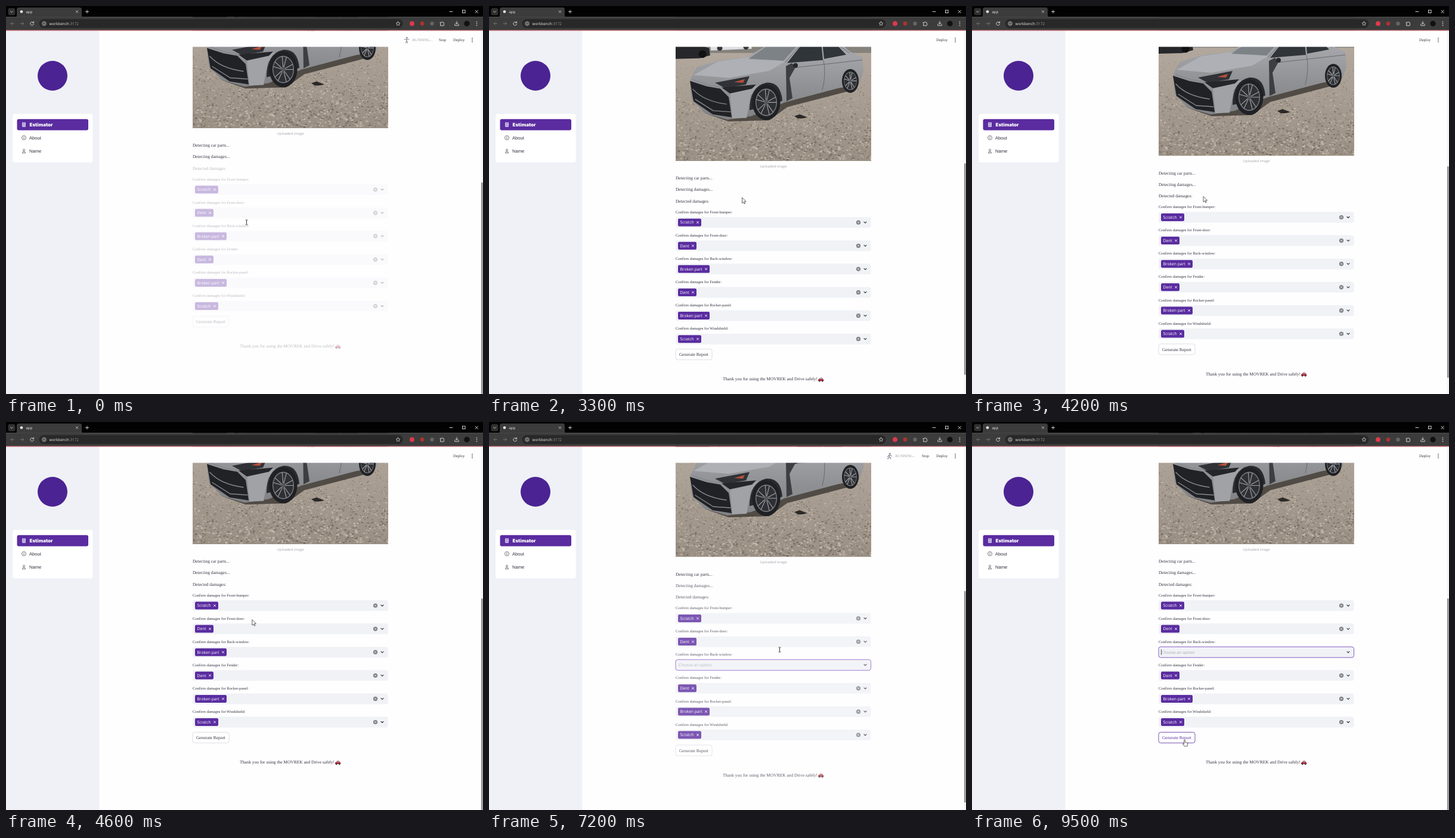
Animation, 800 px wide and 651 px high, one loop 9600 ms. Source, as an HTML page:

```html
<!DOCTYPE html>
<html lang="en">
<head>
<meta charset="utf-8">
<title>app</title>
<style>
html, body { margin: 0; width: 100%; height: 100%; overflow: hidden; background: #fffeff; }
svg { display: block; width: 100vw; height: 100vh; }
text { font-family: "Liberation Serif", serif; font-size: 7.45px; fill: #31333f; text-rendering: geometricPrecision; white-space: pre; }
.label { font-size: 6.5px; }
.sans { font-family: "Open Sans", "Noto Sans", sans-serif; font-size: 6.75px; }
.tag { font-weight: 500; fill: #fff; }
.menu { font-family: "Liberation Sans", sans-serif; font-size: 7.6px; }
.line { fill: none; stroke-linecap: round; stroke-linejoin: round; }
</style>
</head>
<body>
<svg id="stage" viewBox="0 0 800 651" preserveAspectRatio="none"></svg>
<script>
const LOOP = 9600, STEP = 100;
const PURPLE = '#5a2ca0', INK = '#31333f', FIELD = '#f0f2f6';
const IMG_SHIFT = -220.5;

const rect = (x, y, w, h, fill, r = 0, more = '') =>
  `<rect x="${x}" y="${y}" width="${w}" height="${h}" rx="${r}" fill="${fill}" ${more}/>`;
const circle = (x, y, r, fill, more = '') => `<circle cx="${x}" cy="${y}" r="${r}" fill="${fill}" ${more}/>`;
const shape = (d, fill) => `<path d="${d}" fill="${fill}"/>`;
const line = (d, color, w = 1, more = '') => `<path class="line" d="${d}" stroke="${color}" stroke-width="${w}" ${more}/>`;
const text = (x, y, str, cls = '', more = '') => `<text x="${x}" y="${y}" class="${cls}" ${more}>${str}</text>`;
const cross = (x, y, r, color, w) => line(`M${x - r} ${y - r}l${2 * r} ${2 * r}m0 ${-2 * r}l${-2 * r} ${2 * r}`, color, w);
const dots = (x, y, color) => [-3, 0, 3].map(d => circle(x, y + d, 0.85, color)).join('');
const chevron = y => line(`M629 ${y - 1}l2 2 2 -2`, INK, 1.1);

function random(seed) {
  return () => (seed = (seed * 16807) % 2147483647) / 2147483647;
}

// Browser window
function chrome() {
  const pale = '#dedede', dim = '#777';
  return rect(0, 0, 800, 18.5, '#020202') +
    rect(3.5, 3.5, 12, 12, '#303030', 3) + line('M7.5 8.7l2 2 2 -2', pale, 0.9) +
    shape('M15 18.5q3 0 3 -3V6q0 -3.5 3.5 -3.5H123.5q3.5 0 3.5 3.5V15.5q0 3 3 3Z', '#3c3c3c') +
    rect(0, 18.3, 800, 22.4, '#3c3c3c') +
    circle(26, 9.5, 2.3, '#eee') +
    text(33.5, 11.8, 'app', 'sans', 'style="fill:#eee;font-size:6px"') +
    cross(119, 9.5, 1.7, pale, 0.8) +
    line('M133.5 9.5h5m-2.5 -2.5v5', pale, 0.9) +
    line('M744 9.5h5M787 7.2l4.5 4.5m0 -4.5l-4.5 4.5', '#fff', 0.8) +
    rect(765.5, 7, 4.6, 4.6, 'none', 0, 'stroke="#fff" stroke-width=".8"') +
    line('M13.5 29.5h-5.5m2.4 -2.4l-2.4 2.4 2.4 2.4M24 29.5h5.5m-2.4 -2.4l2.4 2.4 -2.4 2.4', dim, 0.9) +
    line('M45.9 27.7a2.9 2.9 0 1 0 .6 2.6M46.5 26.2v2h-2', pale, 0.9) +
    rect(55.5, 22, 610, 15, '#282828', 7.5) +
    circle(64, 29.5, 5, '#3c3c3c') +
    circle(64, 29.5, 2.8, 'none', `stroke="${pale}" stroke-width=".7"`) +
    line('M64 29.3v1.5M64 28v.1', pale, 0.7) +
    text(72.5, 31.8, 'workbench<tspan fill="#9a9a9a">:3172</tspan>', 'sans', 'style="fill:#eee;font-size:6.4px"') +
    line('M657.5 26l1 2.2 2.4 .3 -1.8 1.6 .5 2.4 -2.1 -1.2 -2.1 1.2 .5 -2.4 -1.8 -1.6 2.4 -.3Z', pale, 0.7) +
    circle(681, 29.5, 3.9, '#e0394b') + circle(698, 29.5, 3.4, '#a8342f') + circle(714.5, 29.5, 3.2, '#666') +
    line('M728.5 27.5h2a1 1 0 0 1 2 0h1.5v2a1 1 0 0 1 0 2v1.5h-5.5v-2a1 1 0 0 0 0 -2Z', pale, 0.9) +
    line('M756 25.8v4.5m-2 -2l2 2 2 -2M752.8 30.5v2.3h6.4v-2.3', pale, 0.9) +
    circle(773, 29.5, 4.7, '#111') + dots(789.5, 29.5, pale) +
    rect(0, 40.2, 800, 1.3, '#b9575b');
}

function sidebar() {
  return rect(0, 41, 156.5, 610, '#eff1f6') +
    circle(78, 117, 25, '#4b2393') +
    rect(11, 181, 134.5, 81.5, '#fff', 4) +
    rect(18.5, 189.8, 119.5, 18.6, PURPLE, 3) +
    rect(27, 195.3, 6, 7.6, '#d9cdf0', 0.8) + line('M28.5 197h3M28.5 199.5h.1m1.4 0h.1m1.4 0h.1M28.5 201.3h.1m1.4 0h.1m1.4 0h.1', PURPLE, 0.8) +
    text(39.5, 202, 'Estimator', '', 'style="font:900 8px Inter,sans-serif;fill:#fff"') +
    circle(30, 221, 3.5, 'none', 'stroke="#444" stroke-width=".7"') + line('M30 220.6v2M30 219.2v.1', '#444', 0.8) +
    text(39, 223.8, 'About', 'menu') +
    circle(30, 241.7, 1.5, 'none', 'stroke="#444" stroke-width=".7"') +
    line('M27.4 246.3q0 -2.2 2.6 -2.2t2.6 2.2Z', '#444', 0.7) +
    text(39, 246.2, 'Name', 'menu');
}

// Photo as flat shapes
function gravel() {
  const rnd = random(41), tones = ['#d6cbbf', '#665d53', '#c3b7aa', '#7d7368'], paths = tones.map(() => '');
  for (let i = 0; i < 2600; i++) {
    const depth = rnd() ** 0.6, w = 1 + rnd() * 3.6 * depth;
    const x = 313 + rnd() * 326, y = 243 + depth * 180;
    paths[i % tones.length] += `M${x.toFixed(1)} ${y.toFixed(1)}h${w.toFixed(1)}l-.5 ${(w * 0.6).toFixed(1)}h${(-w * 0.7).toFixed(1)}Z`;
  }
  return `<g opacity=".7">${paths.map((d, i) => shape(d, tones[i])).join('')}</g>`;
}

function wheel(x, y, rx, ry) {
  let spokes = '';
  for (let i = 0; i < 10; i++) {
    const a = (i + (i % 2) * 0.35) * Math.PI / 5;
    spokes += `M${x} ${y}l${(Math.cos(a) * rx * 0.72).toFixed(1)} ${(Math.sin(a) * ry * 0.72).toFixed(1)}`;
  }
  const disc = (k, fill) => `<ellipse cx="${x}" cy="${y}" rx="${rx * k}" ry="${ry * k}" fill="${fill}"/>`;
  return disc(1, '#202124') + disc(0.77, '#76787d') + disc(0.71, '#2e3034') + line(spokes, '#a3a5aa', 1.1) + disc(0.14, '#55575c');
}

function photo() {
  return rect(313, 180, 328, 245.5, 'url(#ground)') + rect(313, 180, 328, 55, 'url(#sky)') +
    shape('M313 233L370 229 440 231 520 230 641 230V244H313Z', '#85817b') + gravel() +
    shape('M371 231L378 228 385 217 411 216 416 226 439 226 441 237 372 240Z', '#dddfe3') +
    shape('M388 219L408 218 411 226 385 227Z', '#575d66') + circle(387, 236, 4.5, '#333') + circle(431, 234, 4.5, '#333') +
    shape('M313 223L336 220 351 230 369 236 371 248 353 253 313 254Z', '#26272a') +
    shape('M318 225L334 223 344 232 319 233Z', '#62666b') + circle(358, 246, 6.5, '#111') +
    shape('M362 345L402 359 470 357 500 335 600 309 618 298 440 325Z', '#514b45') +
    shape('M337 290L348 268 388 256 432 251 470 229 500 222 560 220 590 229 606 242 626 251 628 275 621 296 594 301 496 327 440 350 400 356 362 345 340 322Z', 'url(#paint)') +
    shape('M343 281L385 258 436 251 497 258 470 274 402 286Z', '#aeb0b5') +
    shape('M435 254L470 230 524 224 494 257Z', '#7d8287') +
    shape('M500 261L522 233 557 225 560 256ZM562 254L559 225 580 227 599 247Z', '#30353a') +
    line('M497 260L525 227Q570 215 604 244M561 256Q566 280 559 306M502 270L626 256', '#63656a', 0.9) +
    shape('M498 266L508 261 514 268 504 286 509 320 499 325Z', '#3c3e42') +
    shape('M337 291L365 300 388 304 402 318 407 352 375 347 343 325Z', '#202225') +
    line('M342 289L368 298 391 301M342 305Q360 325 398 330M346 322L376 341 405 343', '#85888d', 1.4) +
    shape('M379 294L437 283 431 297 396 303Z', '#303237') + shape('M411 293L429 288 426 294Z', '#b9503c') +
    shape('M404 312L443 299 454 299 439 315 432 353 408 354Z', '#a0a2a6') +
    shape('M390 302L448 297 441 304 404 312Z', '#25262a') +
    shape('M437 340Q437 300 465 294 489 292 492 324L480 330Z', '#292a2e') +
    wheel(465, 327, 23.5, 30) + wheel(606, 291, 14, 20) +
    circle(514, 265, 4, '#26282c') + shape('M512 350L521 347 534 352 526 354 518 354Z', '#2b2927');
}

// Form
function select(y, name, value, focused) {
  return text(313, y, `Select your car ${name}:`, 'label') +
    rect(313, y + 6, 327.5, 18, FIELD, 3.5, focused ? 'stroke="#9573d0" stroke-width=".8"' : '') +
    text(318, y + 17.4, value, 'sans') + chevron(y + 15);
}

function tag(y, name, w) {
  return rect(317, y + 8.5, w, 13, PURPLE, 2.2) +
    text(320.5, y + 17.3, name, 'sans tag') + cross(317 + w - 6, y + 15, 1.5, '#fff', 0.9);
}

const tagWidth = { Scratch: 39, Dent: 31, 'Broken part': 53 };

function damage(y, part, name, clearable) {
  const clear = circle(619.5, y + 15, 3.6, '#7d7f87', clearable ? 'id="clear"' : '') + cross(619.5, y + 15, 1.2, '#fff', 0.8);
  const chosen = tag(y, name, tagWidth[name]) + clear;
  return text(313, y - 0.4, `Confirm damages for ${part}:`, 'label') +
    rect(313, y + 6, 327.5, 18, FIELD, 3.5) +
    (clearable ? `<g id="chosen">${chosen}</g><g id="empty">` +
      rect(313, y + 6, 327.5, 18, 'none', 3.5, 'stroke="#7b4bc0" stroke-width=".9"') +
      text(318, y + 17.4, 'Choose an option', 'sans', 'style="fill:#a6a8b0"') +
      line(`M317.5 ${y + 10.5}v9`, '#222', 0.7, 'id="caret"') + '</g>' : chosen) +
    chevron(y + 15);
}

function form() {
  const rows = [['Front-bumper', 'Scratch'], ['Front-door', 'Dent'], ['Back-window', 'Broken part'],
    ['Fender', 'Dent'], ['Rocker-panel', 'Broken part'], ['Windshield', 'Scratch']];
  return select(-150.5, 'brand', 'Orveta') + select(-111.5, 'model', 'Pelro') + select(-72.5, 'year', '2023', true) +
    `<g transform="translate(0 ${IMG_SHIFT})" clip-path="url(#frame)">${photo()}</g>` +
    line('M651.5 -37.5v2.5m0 -2.5h2.5m-2.5 0l2 2M656.5 -31.5v-2.5m0 2.5h-2.5m2.5 0l-2 -2', '#555', 0.8, 'id="expand"') +
    text(454.5, 215.8, 'Uploaded image', 'sans', 'style="font-size:5.9px;fill:#a3a4aa"') +
    text(313, 236, 'Detecting car parts...') +
    `<g id="second">${text(313, 255, 'Detecting damages...')}</g><g id="stale">` +
    text(313, 274.5, 'Detected damages:') +
    rows.map(([part, name], i) => damage(293 + 39.1 * i, part, name, i === 2)).join('') +
    rect(313, 520.5, 61, 18, '#fff', 3.5, 'id="button" stroke-width=".8"') +
    text(319, 532.2, 'Generate Report', '', 'id="buttonText"') +
    text(392, 573.3, 'Thank you for using the MOVREK and Drive safely!') +
    shape('M552 574V571.3L554 570.5 555.2 568.5H558.6L560.2 570.8 561.3 571.5V574Z', '#b0303a') +
    shape('M554.8 570.8L555.7 569.2H558.2L559.3 570.8Z', '#9cc3d8') +
    circle(554.2, 574, 1.2, '#333') + circle(559.2, 574, 1.2, '#333') + '</g>';
}

const poses = [
  'M668 56h8M672 55.5v3l-1.5 3.5m1.5 -3.5l1.5 3.5',
  'M669 57l2.5 -1.5 2 1.5 2 -.5M672 56l-.8 3 2.3 1v2M671.2 59l-3 2',
  'M668.5 58.5l2 -3 2.5 .5 2.5 1M672 56l-1.2 3 3 .5 -.5 2.5M670.8 59l-1 2.5 -2 .2',
  'M669 54.5l3 1.5 3 -1.5M672 56v3l-2.5 1.5v1.5m2.5 -3l2.5 3',
  'M668.5 57.5l2.5 -2 2.5 2 2 -1M672 56l-1 3 2.5 1 -1 2M671 59l-1.5 2 -2 .5'
];

function header() {
  return rect(156.5, 41.5, 640, 27, '#fffeff') +
    `<g id="running">${circle(672.3, 53.3, 1.4, '#808490')}${line(poses[0], '#808490', 1.1, 'id="runner"')}` +
    text(681.5, 59, 'RUNNING...', '', 'style="font-size:6.4px;fill:#9d9fa8"') + text(726, 59, 'Stop', 'label') + '</g>' +
    text(750, 59, 'Deploy', 'label') + dots(782, 57, INK);
}

const pointers = {
  arrow: '<path d="M0 0V9.3L2.2 7.3 3.6 10.5 5.1 9.8 3.7 6.7H6.6Z" fill="#fff" stroke="#222" stroke-width=".7"/>',
  beam: line('M-1.8 -4h1.3q.5 0 .5 .6v6.8q0 .6 .5 .6h1.3M1.8 -4h-1.3q-.5 0 -.5 .6v6.8q0 .6 -.5 .6h-1.3', '#222', 0.7),
  hand: '<path d="M-.9 .3Q0 -.7 .9 .3V4L4.5 4.7Q5.6 5 5.4 6.5L4.6 10.5H-.2L-3.2 6.8Q-2.8 5.6 -.9 7Z" fill="#fff" stroke="#222" stroke-width=".7"/>'
};

const gradient = (id, ...stops) => `<linearGradient id="${id}" x2="0" y2="1">` +
  stops.map(([at, color]) => `<stop offset="${at}" stop-color="${color}"/>`).join('') + '</linearGradient>';

const stage = document.getElementById('stage');
stage.innerHTML = '<defs>' +
  gradient('sky', [0, '#bfc2ca'], [0.5, '#cfd1d7'], [1, '#e0e0e3']) +
  gradient('ground', [0.25, '#b3a89d'], [1, '#9a8f83']) +
  gradient('paint', [0.2, '#a3a5a9'], [0.6, '#8f9195'], [1, '#7f8185']) +
  `<clipPath id="frame">${rect(313, 180, 328, 245.5, '#000')}</clipPath></defs>` +
  rect(0, 0, 800, 651, '#fffeff') + `<g id="page">${form()}</g>` + header() + sidebar() +
  rect(796.5, 41.5, 3.5, 610, '#f4f4f5') + rect(797, 296, 2.6, 355, '#8e8e92', 1.3, 'id="thumb"') + chrome() +
  Object.entries(pointers).map(([k, art]) => `<g id="${k}">${art}</g>`).join('');

const $ = id => document.getElementById(id);
const set = (id, name, value) => $(id).setAttribute(name, value);
const show = (id, on) => set(id, 'visibility', on ? 'inherit' : 'hidden');

// Linear interpolation through [time, ...values]
function along(keys, t) {
  const i = keys.findIndex(k => k[0] > t);
  if (i < 0) return keys[keys.length - 1].slice(1);
  if (i === 0) return keys[0].slice(1);
  const a = keys[i - 1], b = keys[i], p = (t - a[0]) / (b[0] - a[0]);
  return a.slice(1).map((v, j) => v + (b[j + 1] - v) * p);
}

const scrollKeys = [[3200, 0], [3600, 220.5], [3900, 220.5], [4200, 46.5], [4400, 0],
  [7100, 0], [7200, 21.5], [7600, 88], [8200, 88], [8500, 0]];
const pointerKeys = [[0, 403.5, 363], [900, 375, 340], [1500, 310, 305], [1900, 341.5, 280.5], [2000, 362, 290],
  [2500, 400, 345], [3000, 449, 325], [3100, 424.5, 321.5], [3900, 424.5, 321.5], [4200, 388, 319.5],
  [5200, 450, 350], [5700, 622, 381], [5800, 624.5, 381.5], [6200, 620, 384], [7200, 487.5, 382],
  [8200, 430, 410], [9100, 442, 470], [9500, 356.5, 533.5]];

function pointerKind(t) {
  if (t < 700 || (t >= 6800 && t < 7600)) return 'beam';
  return (t >= 5600 && t < 6400) || t >= 9400 ? 'hand' : 'arrow';
}

function staleOpacity(t) {
  if (t < 1000) return 0.33;
  if (t < 6700 || t >= 8500) return 1;
  return 1 - 0.67 * Math.min(1, (t - 6700) / 1000) ** 1.7;
}

function draw(t) {
  const [scroll] = along(scrollKeys, t), [x, y] = along(pointerKeys, t);
  const kind = pointerKind(t), cleared = t >= 6200, hover = t >= 9400, stale = staleOpacity(t);
  set('page', 'transform', `translate(0 ${scroll})`);
  set('thumb', 'y', 296 - scroll * 0.58);
  set('stale', 'opacity', stale);
  set('second', 'opacity', t >= 6700 && t < 7500 ? stale : 1);
  show('expand', scroll > 120);
  show('chosen', !cleared);
  show('empty', cleared);
  show('caret', cleared && Math.floor((t - 6200) / 530) % 2 === 0);
  set('clear', 'fill', t >= 5600 && t < 6200 ? INK : '#7d7f87');
  set('button', 'stroke', hover ? PURPLE : '#d5d6db');
  $('buttonText').style.fill = hover ? PURPLE : INK;
  show('running', t < 2000 || (t >= 6200 && t < 9100));
  set('runner', 'd', poses[Math.floor(t / STEP) % poses.length]);
  for (const k in pointers) show(k, k === kind);
  set(kind, 'transform', `translate(${x} ${y})`);
}

const start = performance.now();
function tick(now) {
  const t = Math.max(0, now - start) % LOOP;
  draw(Math.floor(t / STEP) * STEP);
  requestAnimationFrame(tick);
}
draw(0);
requestAnimationFrame(tick);
</script>
</body>
</html>
```
